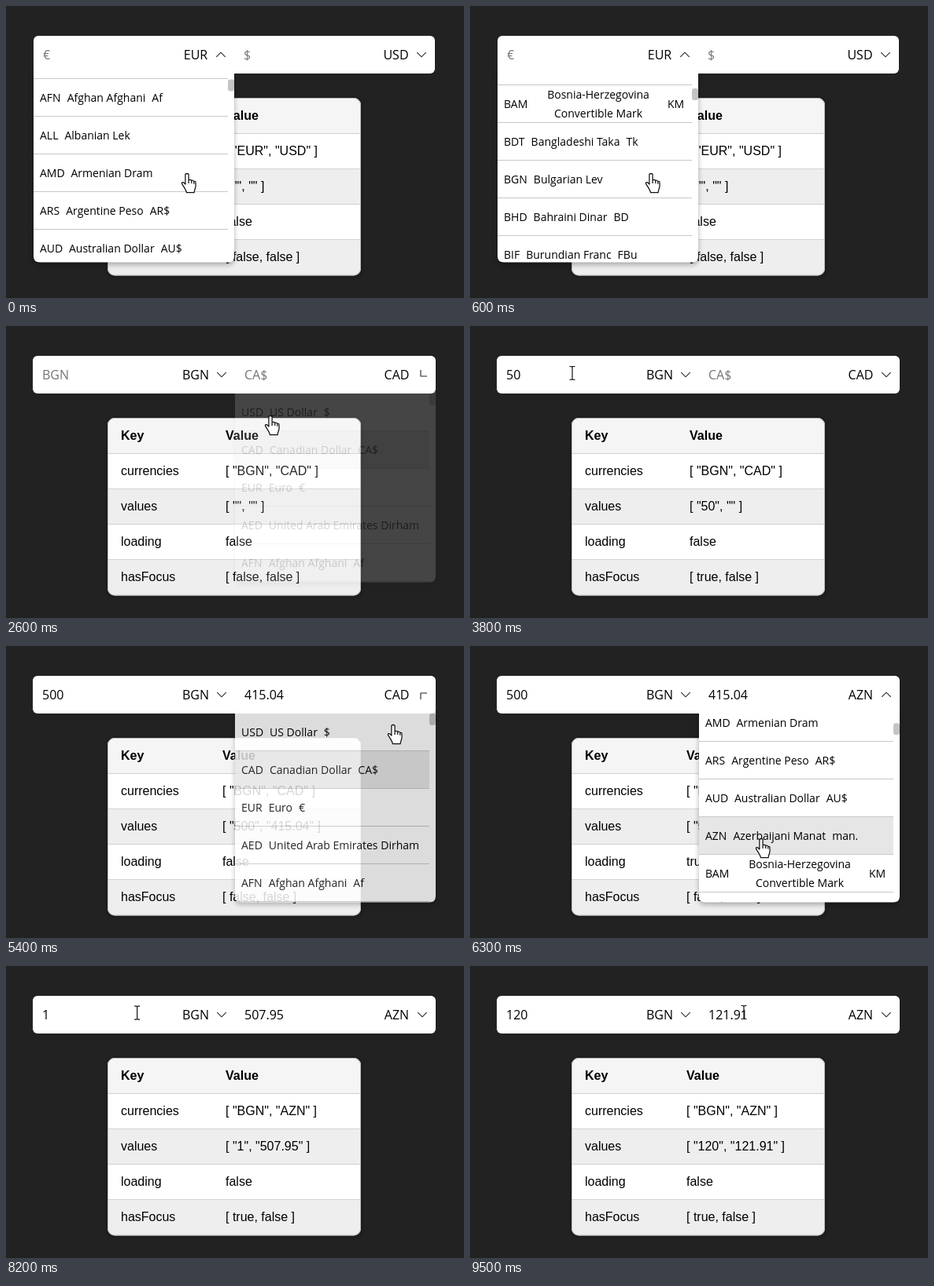
An HTML page for the animation above (9.6 s loop, 582 by 372 pixels).

```html
<!DOCTYPE html>
<html lang="en">
<head>
<meta charset="utf-8">
<title>Currency converter</title>
<style>
  html, body { margin: 0; width: 100%; height: 100%; overflow: hidden; background: #222; }
  svg { display: block; width: 582px; height: 372px; }
  text { font: 16px "Open Sans", "Noto Sans", sans-serif; }
  .row text { font-size: 14px; }
  .cell { font-family: "Liberation Sans", Arial, sans-serif; }
  .head { font-weight: bold; }
  .hint { fill: #757575; }
  .mid { text-anchor: middle; }
  .table { filter: drop-shadow(0 1px 2px rgba(0, 0, 0, .4)); }
  .panel { filter: drop-shadow(0 3px 3px rgba(0, 0, 0, .3)); }
</style>
</head>
<body>
<svg viewBox="0 0 582 372">
  <defs>
    <clipPath id="listClip"><path d="M0 0H255V232.5Q255 240.5 247 240.5H8Q0 240.5 0 232.5Z"/></clipPath>
    <clipPath id="tableClip"><rect x="129" y="117" width="322" height="226.5" rx="9"/></clipPath>
  </defs>
  <g id="scene"></g>
</svg>
<script>
const LOOP = 9600, STEP = 100, ROW = 48;

const currencies = [
  ['USD', 'US Dollar', '$'], ['CAD', 'Canadian Dollar', 'CA$'], ['EUR', 'Euro', '€'],
  ['AED', 'United Arab Emirates Dirham'], ['AFN', 'Afghan Afghani', 'Af'],
  ['ALL', 'Albanian Lek'], ['AMD', 'Armenian Dram'], ['ARS', 'Argentine Peso', 'AR$'],
  ['AUD', 'Australian Dollar', 'AU$'], ['AZN', 'Azerbaijani Manat', 'man.'],
  ['BAM', 'Bosnia-Herzegovina|Convertible Mark', 'KM'], ['BDT', 'Bangladeshi Taka', 'Tk'],
  ['BGN', 'Bulgarian Lev'], ['BHD', 'Bahraini Dinar', 'BD'],
  ['BIF', 'Burundian Franc', 'FBu'], ['BND', 'Brunei Dollar', 'BN$']
];

// Timelines: [time, value]
const fields = [
  {
    code: [[0, 'EUR'], [1100, 'BGN']],
    amount: [[0, ''], [3700, '5'], [3800, '50'], [4200, '500'], [8200, '1'], [8300, '12'], [9000, '120']],
    open: [[0, 1], [1150, 1], [1350, 0]],
    scroll: [[0, 185], [600, 465]]
  },
  {
    code: [[0, 'USD'], [2500, 'CAD'], [6200, 'AZN']],
    amount: [[0, ''], [4900, '415.04'], [7000, '507.95'], [9500, '121.91']],
    open: [[1650, 0], [1850, 1], [2450, 1], [2650, 0], [5250, 0], [5450, 1], [6350, 1], [6550, 0]],
    scroll: [[5500, 0], [6000, 300]]
  }
];
const loading = [[0, false], [4400, true], [4900, false], [6200, true], [7000, false], [9200, true], [9500, false]];
const focus = [[0, false], [3400, true], [5200, false], [7700, true]];
const selected = [[0, false], [7700, true], [8200, false]];

// Pointer: [time, x, y, shape]
const pointer = [
  [0, 231, 214, 'hand'], [1100, 231, 214, 'hand'], [1400, 538, 70, 'hand'], [1600, 538, 70, 'hand'],
  [1700, 530, 66, 'hand'], [2000, 430, 150, 'hand'], [2100, 430, 150, 'hand'], [2200, 395, 152, 'hand'],
  [2400, 395, 152, 'hand'], [2600, 337, 115, 'hand'], [3000, 130, 60, 'beam'], [5100, 130, 60, 'beam'],
  [5300, 530, 66, 'hand'], [5400, 493, 101, 'hand'], [5700, 371, 246, 'hand'], [6300, 371, 246, 'hand'],
  [6600, 528, 255, 'arrow'], [7300, 528, 255, 'arrow'], [7400, 76, 60, 'beam'], [8100, 76, 60, 'beam'],
  [8400, 348, 59, 'beam']
];
const shapes = {
  hand: `<path fill="#fff" stroke="#111" stroke-width="1.2" stroke-linejoin="round" transform="translate(-1 -.5) scale(1.05)"
    d="M-2 1.5C-2-.5 2-.5 2 1.5V8C3 7 5 7.3 5.5 8.6
    6.5 7.8 8 8.3 8.4 9.6 9.6 9 10.5 9.6 10.5 11V15C10.5 18 9 19 8.7 23H-.5C-1 20-4 16-6 12.5-7 10.5-4.8 10-3.6 11.2L-2 13Z
    M2 8V12M5.5 8.6V12M8.4 9.6V12.5"/>`,
  arrow: '<path fill="#fff" stroke="#111" stroke-width=".8" d="M0 0V16L3.7 12.4 6.2 18 8.6 17 6.2 11.4H11Z"/>',
  beam: '<path fill="none" stroke="#111" stroke-width="1.2" d="M-3.5-8.5H-1L0-7.5 1-8.5H3.5M0-7.5V7.5M-3.5 8.5H-1L0 7.5 1 8.5H3.5"/>'
};

const last = (keys, t) => keys.filter(k => k[0] <= t).pop() || keys[0];
const at = (keys, t) => last(keys, t)[1];
const rect = (x, y, w, h, fill, r = 0) =>
  `<rect x="${x}" y="${y}" width="${w}" height="${h}" rx="${r}" fill="${fill}"/>`;
const text = (x, y, s, cls = '', fill = '') =>
  `<text x="${x}" y="${y}" class="${cls}"${fill && ` fill="${fill}"`}>${s}</text>`;

function tween(keys, t, i = 1) {
  const a = last(keys, t), b = keys[keys.indexOf(a) + 1];
  if (!b || t <= a[0]) return a[i];
  return a[i] + (b[i] - a[i]) * (t - a[0]) / (b[0] - a[0]);
}

function table(t) {
  const pair = key => `[ "${at(fields[0][key], t)}", "${at(fields[1][key], t)}" ]`;
  const values = pair('amount');
  const col = values.length > 17 ? 275 : 279;
  const rows = [
    ['Key', 'Value'], ['currencies', pair('code')], ['values', values],
    ['loading', at(loading, t)], ['hasFocus', `[ ${at(focus, t)}, false ]`]
  ];
  const cells = rows.map(([key, value], i) => {
    const y = 117 + 45 * i, cls = i ? 'cell' : 'cell head';
    return rect(129, y, 322, 47, ['#f5f5f5', '#fff', '#eee', '#fff', '#eee'][i]) +
      (i ? rect(129, y, 322, 1, '#d2d2d2') : '') +
      text(146, y + 28, key, cls) + text(col, y + 28, value, cls);
  });
  return `<g class="table"><g clip-path="url(#tableClip)">${cells.join('')}</g>
    <rect x="129.5" y="117.5" width="321" height="225.5" rx="8.5" fill="none" stroke="#bbb"/></g>`;
}

function listRow([code, name, symbol], y, active) {
  const lines = name.split('|'), base = y + 28.5;
  let body;
  if (lines.length > 1) {
    body = text(8, base, code) + text(128, base - 12, lines[0], 'mid') +
      text(128, base + 12, lines[1], 'mid') + text(216, base, symbol);
  } else {
    const parts = [name, symbol].filter(Boolean).map(s => `<tspan dx="8">${s}</tspan>`);
    body = text(8, base, code + parts.join(''));
  }
  return (active ? rect(0, y, 247, ROW, '#e6e6e6') : '') + body + rect(0, y + 47, 247, 1, '#c8c8c8');
}

function panel(f, x, t) {
  const p = tween(f.open, t);
  if (!p) return '';
  const scroll = tween(f.scroll, t), code = at(f.code, t);
  const rows = currencies.map((c, i) => listRow(c, i * ROW - scroll, c[0] === code));
  return `<g class="panel" opacity="${p * p * (3 - 2 * p)}" transform="translate(${x} 86)">
    <path fill="#fff" d="M0-6H255V232.5Q255 240.5 247 240.5H8Q0 240.5 0 232.5Z"/>
    <g class="row" clip-path="url(#listClip)">${rows.join('')}
    ${rect(247, scroll * .041, 8, 15, '#c4c4c4', 3)}</g></g>`;
}

function field(f, x, mid, arrow, t) {
  const code = at(f.code, t), amount = at(f.amount, t);
  const hint = currencies.find(c => c[0] === code)[2] || code;
  const marked = f === fields[0] && at(selected, t);
  return (marked ? rect(x + 12, 51, 27.5, 22, '#0078d7') : '') +
    text(x + 12, 68, amount || hint, amount ? '' : 'hint', marked ? '#fff' : '') +
    text(mid, 67.5, code, 'mid') +
    `<path fill="none" stroke="#222" stroke-width="1.1" d="M-5.7-2.8L0 2.8 5.7-2.8"
      transform="translate(${arrow} 62) rotate(${180 * tween(f.open, t)})"/>`;
}

function draw(t) {
  const wide = t < 1200 ? 0 : 1;
  const left = 35 - wide, right = 290 + wide;
  const shape = last(pointer, t)[3];
  return table(t) +
    panel(fields[0], left, t) + panel(fields[1], right, t) +
    rect(left, 38, 510 + 2 * wide, 48, '#fff', 6) +
    field(fields[0], left, 241, 273 + wide, t) +
    field(fields[1], right, 495.5 + wide, 528 + wide, t) +
    `<g transform="translate(${tween(pointer, t, 1)} ${tween(pointer, t, 2)})">${shapes[shape]}</g>`;
}

const scene = document.getElementById('scene');
const start = performance.now();
let shown = -1;
function frame(now) {
  const t = Math.floor(Math.max(0, now - start) % LOOP / STEP) * STEP;
  if (t !== shown) scene.innerHTML = draw(shown = t);
  requestAnimationFrame(frame);
}
frame(start);
</script>
</body>
</html>
```
